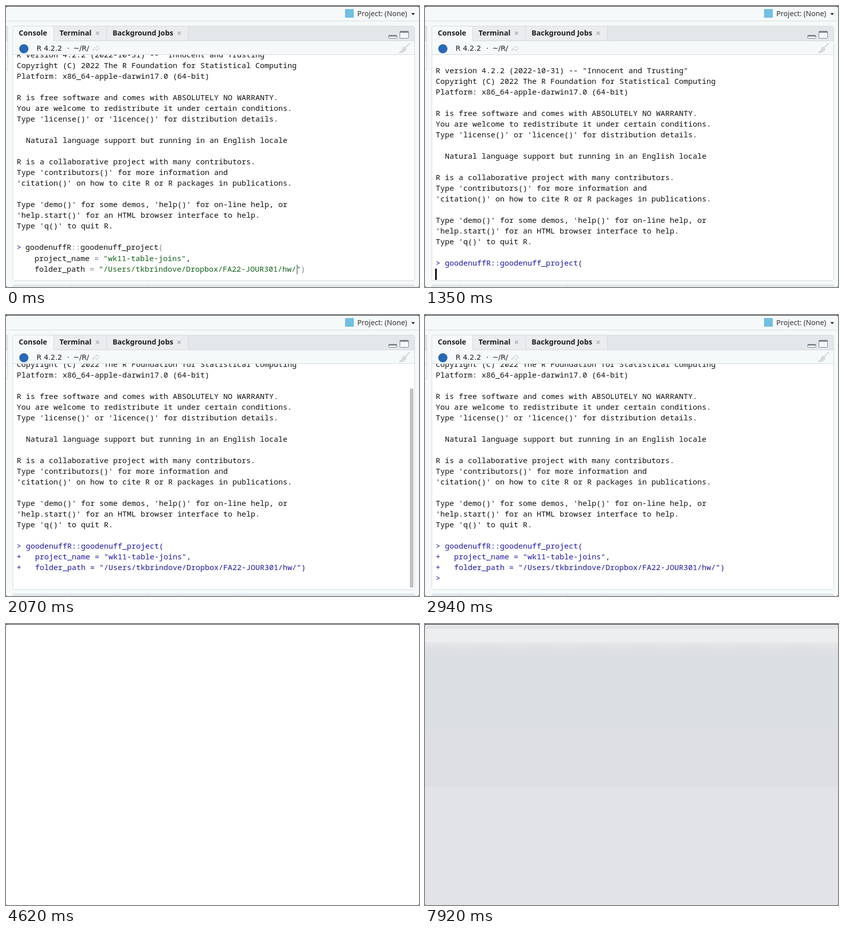
Recreate the animation shown at these times as an HTML page. Size 810 by 552 pixels, loop 8 s.

```html
<!DOCTYPE html>
<html lang="en">
<head>
<meta charset="utf-8">
<title>Console session</title>
<style>
  html, body { margin: 0; width: 100%; height: 100%; overflow: hidden; background: #1e2022; }
  .stage { position: absolute; left: 0; top: 1px; width: 810px; height: 551px; overflow: hidden; border-radius: 3px; background: #f5f9fa; }
  .stage > * { position: absolute; left: 0; top: -1px; }
  .ui { font: 14.1px "Noto Sans", sans-serif; }
  .tab { font-weight: 700; font-size: 14.2px; }
  .ver { font: 14px "DejaVu Sans", sans-serif; }

  .stage > .console { left: 14px; top: 95px; width: 787px; height: 443px; overflow: hidden; background: #fff; }
  .feed, .feed > *, .thumb { position: absolute; }
  .feed { left: 7px; top: 0; }
  pre { margin: 0; left: 0; top: 0; font: 15px/21px "Noto Sans Mono", monospace; color: #111; }
  .edit, .echo { top: 378px; }
  .edit { line-height: 21.5px; }
  .edit div { position: absolute; left: 17px; top: 0; }
  .echo, .edit b { color: #1f189c; font-weight: 400; }
  .edit i { color: #788390; font-style: normal; }
  .edit u { color: #14601c; text-decoration: none; }
  .caret { left: 549px; top: 423px; width: 2px; height: 19px; background: #8c9490; }
  .block { left: -1px; top: 400px; width: 3px; height: 22px; background: #000; }
  .thumb { left: 778px; top: 48px; width: 7px; height: 392px; border-radius: 4px; background: #c1c1c1; }

  .blank, .sheen { width: 810px; height: 552px; }
  .blank { background: #fff; }
  .blank > * { position: absolute; left: 0; top: 0; }
  .sheen { background: linear-gradient(#e3e4e7 9px, #edeef0 10px 35px, #e6e8ea 36px, #dfe0e4 51px, #dadfe1 64px 208px, #dedfe3 209px 319px, #e2e3e7 321px); }
  .spin { transform-origin: 40px 265px; }

  /* 1% of the loop is 80 ms */
  .feed, .edit, .echo, .more, .ready, .caret, .block, .thumb, .blank, .sheen, .spin { animation: 8s step-end infinite; }
  .feed { animation-name: scroll; }
  .edit { animation-name: edit; }
  .echo { animation-name: echo; }
  .more { animation-name: more; }
  .ready { animation-name: ready; }
  .caret { animation-name: caret; }
  .block { animation-name: block; }
  .thumb { animation-name: thumb; animation-timing-function: linear; }
  .blank { animation-name: blank; }
  .sheen { animation-name: sheen; animation-timing-function: linear; }
  .spin { animation-name: spin; }

  @keyframes scroll {
    0% { transform: translateY(-11px); }
    16.5% { transform: translateY(20px); }
    17.625%, 100% { transform: translateY(-31px); }
  }
  @keyframes edit { 0% { opacity: 1; } 16.5%, 100% { opacity: 0; } }
  @keyframes echo { 0% { opacity: 0; } 16.5%, 100% { opacity: 1; } }
  @keyframes more { 0% { opacity: 0; } 17.625%, 100% { opacity: 1; } }
  @keyframes ready { 0% { opacity: 0; } 31.5%, 100% { opacity: 1; } }
  @keyframes caret {
    0% { opacity: 1; }
    2.625% { opacity: .5; }
    3% { opacity: 0; }
    7.875% { opacity: 0; animation-timing-function: linear; }
    9.75% { opacity: 1; }
    16.5%, 100% { opacity: 0; }
  }
  @keyframes block {
    0% { opacity: 0; top: 400px; }
    16.5% { opacity: 1; top: 400px; }
    17.625% { opacity: 1; top: 442px; }
    22.875%, 100% { opacity: 0; top: 442px; }
  }
  @keyframes thumb {
    0%, 17.625% { opacity: 0; }
    18.375%, 26.25% { opacity: 1; }
    29.625%, 100% { opacity: 0; }
  }
  @keyframes blank {
    0% { visibility: hidden; background: #fff; }
    57.75% { visibility: visible; background: #fff; }
    91.125%, 100% { visibility: visible; background: #e2e4e8; }
  }
  @keyframes sheen { 0%, 91.875% { opacity: 0; } 94.875%, 100% { opacity: 1; } }
  @keyframes spin {
    0% { opacity: 0; transform: rotate(0); }
    91.125% { opacity: 1; transform: rotate(0); }
    91.875% { opacity: 1; transform: rotate(30deg); }
    93% { opacity: 1; transform: rotate(60deg); }
    94% { opacity: 1; transform: rotate(90deg); }
    94.875% { opacity: 1; transform: rotate(120deg); }
    97.125% { opacity: 1; transform: rotate(150deg); }
    98.125% { opacity: 1; transform: rotate(180deg); }
    99%, 100% { opacity: 0; transform: rotate(180deg); }
  }
</style>
</head>
<body>
<div class="stage">
  <svg class="ui" width="810" height="552" fill="#1c1e20">
    <!-- top bar -->
    <path d="M0 29.5H810" stroke="#d3d9dc"/>
    <rect x="665" y="6" width="17" height="17" fill="#72bfe2"/>
    <text x="689" y="20" fill="#333">Project: (None)</text>
    <path d="M795 14h7l-3.5 4z"/>

    <!-- neighbouring panes -->
    <path d="M0 39.5H3.5V125.5H0" fill="#f5f9fa" stroke="#d3d9dc"/>
    <path d="M0 40H3V68H0z" fill="#e3e6e9"/>
    <path d="M0 68.5H3M0 95.5H3" stroke="#d3d9dc"/>
    <path d="M13.5 552V550q0-2 2-2H799.5q2 0 2 2V552" fill="#e6e9ec" stroke="#d3d9dc"/>
    <path d="M69.5 548v4M128.5 548v4M217.5 548v4M278.5 548v4M345.5 548v4M458.5 548v4" stroke="#cdd3d6"/>

    <!-- console pane -->
    <rect x="13.5" y="39.5" width="788" height="500" rx="3" fill="#f5f9fa" stroke="#d3d9dc"/>
    <path d="M94 40H799q2 0 2 2V68H94z" fill="#e4e7ea"/>
    <path d="M94 40H357V68H94z" fill="#ebecef"/>
    <path d="M93.5 40V68.5H801M197.5 40V68M357.5 40V68M14 95.5H801" fill="none" stroke="#d3d9dc"/>
    <g class="tab">
      <text x="25" y="58">Console</text>
      <text x="105" y="58">Terminal</text>
      <text x="209" y="58">Background Jobs</text>
    </g>
    <path d="M176.5 50.5l6 6m0-6l-6 6M336.500 50.5l6 6m0-6l-6 6" stroke="#b3b6b8" stroke-width="2"/>
    <g fill="#f4f7f8" stroke="#75838a">
      <rect x="750.5" y="57.500" width="16" height="6" rx="1"/>
      <rect x="772.5" y="49.5" width="17" height="14" rx="1"/>
      <path d="M751 58.500H766M773 51H789" stroke-width="3"/>
    </g>
    <circle cx="35" cy="84" r="9" fill="#2868b5"/>
    <g class="ver">
      <text x="60" y="88">R 4.2.2</text>
      <text x="120" y="88">·</text>
      <text x="132" y="88">~/R/</text>
    </g>
    <path d="M170 88q1-7 8-7v-3l6 5-6 5v-3q-5-1-8 3z" fill="#f8fafb" stroke="#c3c8cb"/>
    <path d="M792 73l-9 9" stroke="#cfd2d4" stroke-width="2"/>
    <path d="M780 80l5 5q-4 7-14 7 6-4 9-12z" fill="#d8dadb" stroke="#c9cccd"/>
  </svg>

  <div class="console">
    <div class="feed">
<pre>R version 4.2.2 (2022-10-31) -- "Innocent and Trusting"
Copyright (C) 2022 The R Foundation for Statistical Computing
Platform: x86_64-apple-darwin17.0 (64-bit)

R is free software and comes with ABSOLUTELY NO WARRANTY.
You are welcome to redistribute it under certain conditions.
Type 'license()' or 'licence()' for distribution details.

  Natural language support but running in an English locale

R is a collaborative project with many contributors.
Type 'contributors()' for more information and
'citation()' on how to cite R or R packages in publications.

Type 'demo()' for some demos, 'help()' for on-line help, or
'help.start()' for an HTML browser interface to help.
Type 'q()' to quit R.</pre>
<pre class="edit"><b>&gt;</b><div>goodenuffR<i>::</i>goodenuff_project<i>(</i>
  project_name <i>=</i> <u>"wk11-table-joins"</u>,
  folder_path <i>=</i> <u>"/Users/tkbrindove/Dropbox/FA22-JOUR301/hw/"</u><i>)</i></div></pre>
<pre class="echo">&gt; goodenuffR::goodenuff_project(
<span class="more">+   project_name = "wk11-table-joins",
+   folder_path = "/Users/tkbrindove/Dropbox/FA22-JOUR301/hw/")</span>
<span class="ready">&gt;</span></pre>
      <div class="caret"></div>
      <div class="block"></div>
    </div>
    <div class="thumb"></div>
  </div>

  <div class="blank">
    <div class="sheen"></div>
    <svg width="810" height="552"><g class="spin" stroke="#25272b" stroke-width="2.2" stroke-linecap="round"></g></svg>
  </div>
</div>
<script>
  // Spokes fade counter-clockwise from the top one.
  const spokes = Array.from({ length: 12 }, (_, i) =>
    `<path d="M40 258V252" opacity="${1 - i * 0.078}" transform="rotate(${-30 * i} 40 265)"/>`);
  document.querySelector('.spin').innerHTML = spokes.join('');
</script>
</body>
</html>
```
